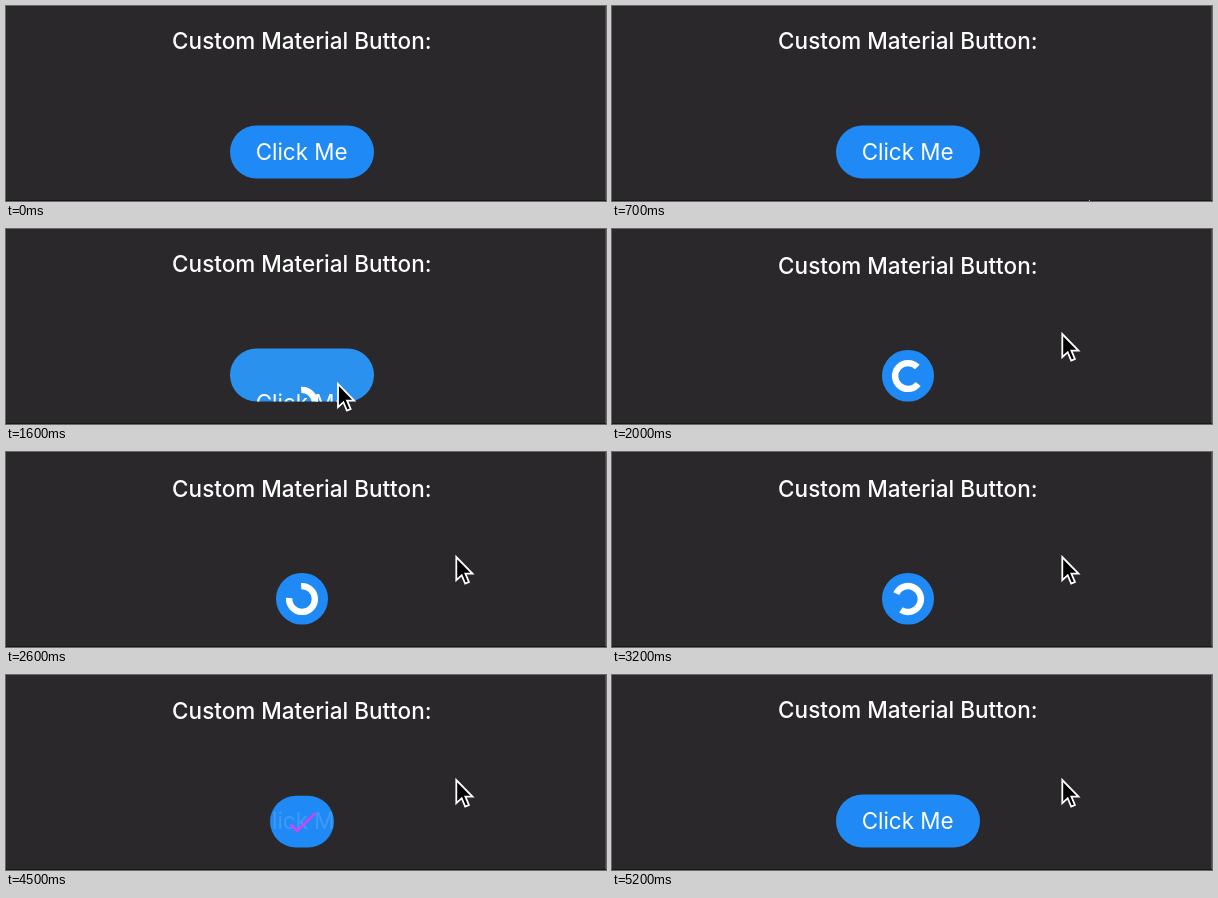
Write an HTML page that moves like this. It is 600 by 195 pixels and loops after 5.3 s.

```html
<!DOCTYPE html>
<html lang="en">
<head>
<meta charset="utf-8">
<title>Material button</title>
<style>
  html, body { margin: 0; width: 100%; height: 100%; overflow: hidden; background: #2a282a; }
  svg { display: block; width: 600px; height: 195px; }
  text { font: 400 22.4px Inter, "Open Sans", sans-serif; fill: #fff; text-anchor: middle; }
  #title { font-size: 22.5px; font-weight: 450; }
</style>
</head>
<body>
<svg viewBox="0 0 600 195">
  <defs>
    <clipPath id="buttonClip"><rect id="clipShape"/></clipPath>
  </defs>
  <rect width="600" height="195" fill="#2a282a"/>
  <rect x="599" width="1" height="195" fill="#4a4a46"/>
  <rect y="194" width="600" height="1" fill="#171718"/>
  <text id="title" x="295.8">Custom Material Button:</text>
  <rect id="button"/>
  <g clip-path="url(#buttonClip)">
    <text id="label" x="295.6">Click Me</text>
    <path id="spinner" fill="none" stroke="#fff" stroke-width="6.4"/>
    <path id="check" d="M284.3 149.3L291.2 155.8L309 138.3" fill="none" stroke="#e83af0"
      stroke-width="2.5" pathLength="1" stroke-dasharray="1 2"/>
  </g>
  <path id="cursor" d="M0 0V23.2L5.4 18.2L8.9 26.6L12.6 25L9.1 16.7H16.2Z" fill="#000"
    stroke="#fff" stroke-width="1.8"/>
</svg>
<script>
const LOOP = 5300;
const $ = id => document.getElementById(id);
const [title, button, clipShape, label, spinner, check, cursor] =
  ['title', 'button', 'clipShape', 'label', 'spinner', 'check', 'cursor'].map($);

const set = (el, attrs) => {
  for (const name in attrs) el.setAttribute(name, attrs[name]);
};
const clamp = v => Math.max(0, Math.min(1, v));
const progress = (t, start, end) => clamp((t - start) / (end - start));
const smooth = p => p * p * (3 - 2 * p);
const ease = (t, start, end) => smooth(progress(t, start, end));
const mix = (a, b, p) => a + (b - a) * p;

// time, x, y of the pointer tip
const pointerPath = [
  [650, 482, 198], [1100, 366, 138.8], [1300, 332, 155],
  [1600, 332, 155], [1850, 450.3, 105]
];

function pointerAt(t) {
  const next = pointerPath.findIndex(key => key[0] > t);
  if (next === 0) return null;
  if (next < 0) return pointerPath.at(-1).slice(1);
  const [a, b] = [pointerPath[next - 1], pointerPath[next]];
  const p = ease(t, a[0], b[0]);
  return [mix(a[1], b[1], p), mix(a[2], b[2], p)];
}

// One turn per second with cubic easing at both ends.
function spinAngle(t) {
  const p = ((t - 1550) / 1000 % 1 + 1) % 1;
  const half = x => 4 * x ** 3;
  return 225 + 360 * (p < 0.5 ? half(p) : 1 - half(1 - p));
}

const RADIUS = 12.9;
const halfGap = 41 * Math.PI / 180;
const arcX = RADIUS * Math.cos(halfGap);
const arcY = RADIUS * Math.sin(halfGap);
set(spinner, { d: `M${arcX} ${arcY}A${RADIUS} ${RADIUS} 0 1 1 ${arcX} ${-arcY}` });

function render(t) {
  const open = ease(t, 4400, 4850);
  const shrink = t < 4000 ? ease(t, 1750, 1980) : 1 - open;
  const swap = ease(t, 1400, 1800);
  const hover = ease(t, 1150, 1350) - ease(t, 1650, 1850);

  const width = mix(144, 52, shrink);
  const height = mix(53, 51.7, shrink);
  const y = mix(119.5, 120.9, shrink);
  const box = { x: 296 - width / 2, y, width, height, rx: height / 2 };
  set(button, {
    ...box,
    fill: `rgb(${mix(31, 43, hover)},${mix(138, 145, hover)},${mix(245, 238, hover)})`
  });
  set(clipShape, box);
  set(title, { y: mix(43, 44.7, shrink) });

  const returning = t > 4000;
  set(label, {
    y: mix(153.8, 154.5, shrink) + (returning ? 0 : swap * 55),
    opacity: returning ? clamp(open * 1.1) : 1
  });

  set(spinner, {
    transform: `translate(296 ${147 + 54 * (1 - swap)}) rotate(${spinAngle(t)})`,
    opacity: swap > 0 ? 1 - progress(t, 3600, 3700) : 0
  });

  set(check, {
    'stroke-dashoffset': 1 - ease(t, 3650, 4000),
    opacity: t > 3680 ? 1 - progress(open, 0.1, 0.7) : 0
  });

  const tip = pointerAt(t);
  set(cursor, {
    visibility: tip ? 'visible' : 'hidden',
    transform: tip ? `translate(${tip[0]} ${tip[1]})` : ''
  });
}

const startTime = performance.now();
function frame() {
  render((performance.now() - startTime) % LOOP);
  requestAnimationFrame(frame);
}
frame();
</script>
</body>
</html>
```
